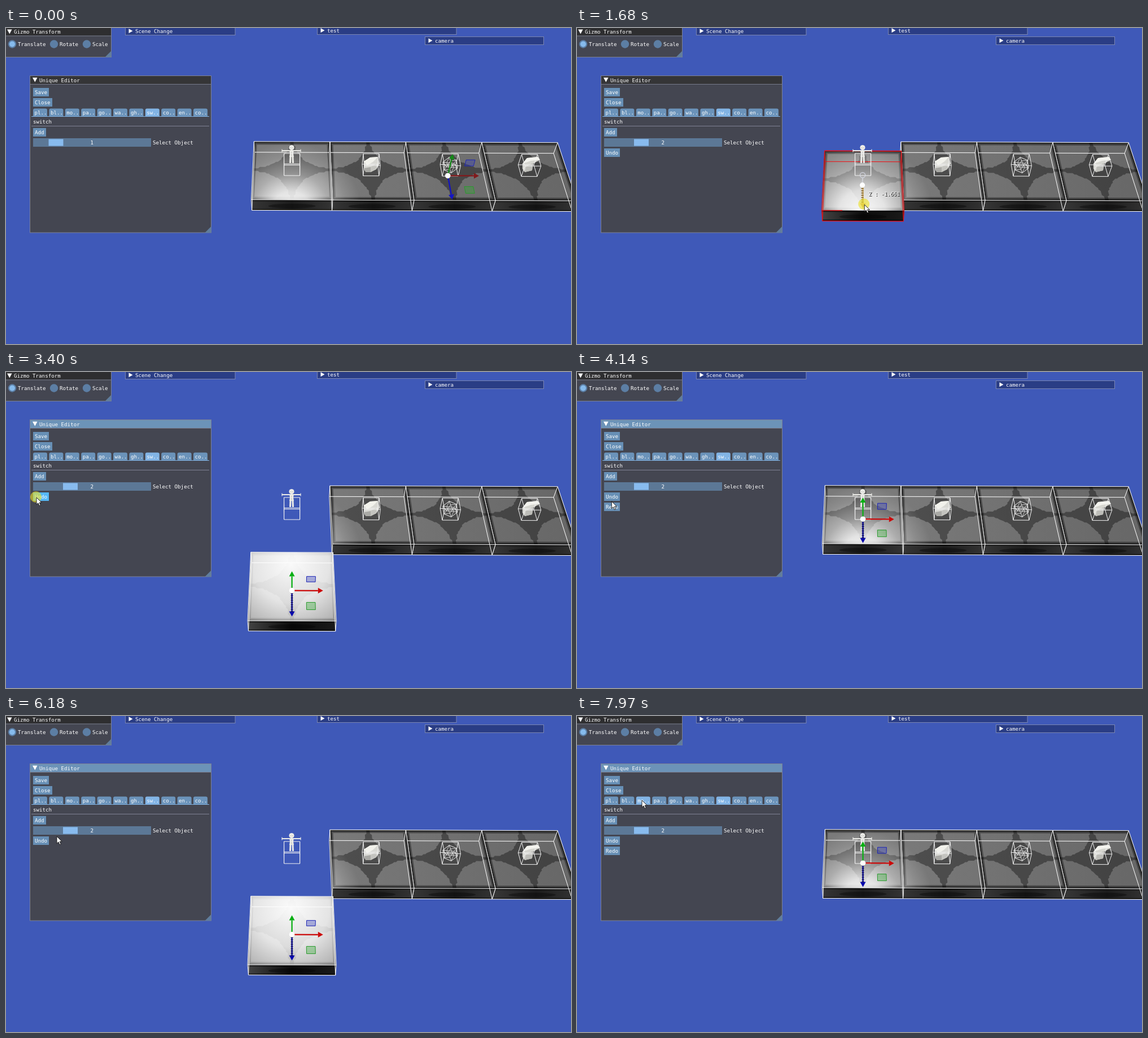
Write an HTML page with a canvas that moves like this. It is 1001x559 px and loops after 8000 ms.

```html
<!DOCTYPE html>
<html lang="en">
<head>
<meta charset="utf-8">
<title>Unique Editor</title>
<style>
  html, body { margin: 0; width: 100%; height: 100%; overflow: hidden; background: #3f59b8; }
  canvas { display: block; }
</style>
</head>
<body>
<canvas id="stage" width="1001" height="559"></canvas>
<script>
const g = document.getElementById('stage').getContext('2d');
const LOOP = 8000, MOVED = 1.1346, UNIT = 9.774;
const ORANGE = '#dca75f';

// time, x, y of the pointer tip
const pointer = [
  [190, 640, 575], [800, 506, 268], [930, 506, 267], [1000, 506, 267],
  [1210, 506, 290], [1540, 506, 290], [1610, 507, 300], [1960, 528, 417],
  [2250, 530, 424], [2390, 530, 424], [2780, 38, 226], [2920, 54, 222],
  [3860, 54, 222], [4480, 71, 238], [5480, 71, 238], [5800, 291, 317],
  [6180, 90, 213], [6310, 85, 214], [6470, 68, 222], [6740, 68, 222],
  [7080, 121, 126], [7150, 121, 124], [7350, 121, 124], [7640, 98, 146], [7970, 115, 149]
];
const drag = [[1540, 0], [1610, 0.06], [1960, 1.09], [2250, MOVED]];
const presses = [[840, 915], [1540, 2390], [3400, 3530], [4480, 4580], [6640, 6770]];

function track(keys, t) {
  if (t <= keys[0][0]) return keys[0].slice(1);
  for (let i = 1; i < keys.length; i++) {
    const a = keys[i - 1], b = keys[i];
    if (t <= b[0]) {
      let k = (t - a[0]) / (b[0] - a[0]);
      k = k * k * (3 - 2 * k);
      return a.slice(1).map((v, j) => v + (b[j + 1] - v) * k);
    }
  }
  return keys[keys.length - 1].slice(1);
}

function offsetAt(t) {
  if (t < 3530) return track(drag, t)[0];
  return t >= 4550 && t < 6740 ? MOVED : 0;
}

// X: across, u: toward the viewer, h: downward from the block tops
function project(X, u, h) {
  const d = 0.007435 + 0.000115 * h - 0.0005 * u;
  const x = 506.6 + X / d;
  return [x, (1.4944 + 0.1666 * h + 0.6138 * u) / d + (x - 506) * 0.0037];
}

function trace(pts, open) {
  g.beginPath();
  pts.forEach((p, i) => i ? g.lineTo(p[0], p[1]) : g.moveTo(p[0], p[1]));
  if (!open) g.closePath();
}
function fill(pts, color) { trace(pts); g.fillStyle = color; g.fill(); }
function line(a, b, color, width = 1) {
  trace([a, b], true);
  g.strokeStyle = color; g.lineWidth = width; g.stroke();
}
function disc(x, y, r, color) {
  g.beginPath(); g.arc(x, y, r, 0, 7); g.fillStyle = color; g.fill();
}
function ring(x, y, r, color) {
  g.beginPath(); g.arc(x, y, r, 0, 7); g.strokeStyle = color; g.lineWidth = 1.2; g.stroke();
}
function rect(x, y, w, h, color, r = 0) {
  g.beginPath(); g.roundRect(x, y, w, h, r); g.fillStyle = color; g.fill();
}
function frame(x, y, w, h, color) {
  g.strokeStyle = color; g.lineWidth = 1; g.strokeRect(x, y, w, h);
}
function label(s, x, y, color = '#fff') { g.fillStyle = color; g.fillText(s, x, y); }

function corners(X, u, half, depth, top, bottom) {
  const at = h => [[X - half, u], [X + half, u], [X + half, u + depth], [X - half, u + depth]]
    .map(p => project(p[0], p[1], h));
  return [at(top), at(bottom)];
}

function wire([top, bottom], color) {
  for (let i = 0; i < 4; i++) {
    const j = (i + 1) % 4;
    line(top[i], top[j], color);
    line(bottom[i], bottom[j], color);
    line(top[i], bottom[i], color);
  }
}

function hoverWire([top, bottom], moved) {
  const red = '#f40c10', mix = (a, b, k) => [a[0] + (b[0] - a[0]) * k, a[1] + (b[1] - a[1]) * k];
  line(top[0], moved ? top[1] : mix(top[0], top[1], 0.14), red, 1.3);
  line(moved ? bottom[0] : mix(bottom[0], bottom[1], 0.55), bottom[1], red);
  line(top[3], moved ? mix(top[3], top[2], 0.25) : top[2], red, 1.2);
  line(bottom[3], bottom[2], red, 1.3);
  for (const i of [0, 1, 2, 3]) line(top[i], bottom[i], red);
  for (const face of [top, bottom]) {
    line(face[0], face[3], red);
    line(face[1], face[2], red);
  }
}

// four-pointed star left between quarter circles at the corners
function star(X, u, h = 0) {
  const pts = [], snap = v => Math.round(v * 44) / 44;
  for (let q = 0; q < 4; q++) {
    const cx = q === 0 || q === 3 ? -0.5 : 0.5, cy = q < 2 ? 0 : 1;
    for (let i = 0; i <= 24; i++) {
      const a = Math.PI / 2 * (q + 1 - i / 24);
      pts.push(project(X + snap(cx + 0.472 * Math.cos(a)), u + snap(cy + 0.472 * Math.sin(a)), h));
    }
  }
  return pts;
}

function block(X, u, shift, hover) {
  const box = corners(X, u, 0.5, 1, 0, 1), [top, bottom] = box;
  const k = shift / MOVED;
  fill([top[0], top[3], bottom[3], bottom[0]], '#141414');

  const front = [top[3], top[2], bottom[2], bottom[3]];
  const dark = g.createLinearGradient(top[3][0], 0, top[2][0], 0);
  dark.addColorStop(0, k ? '#444' : '#363636');
  dark.addColorStop(0.5, k ? '#0a0a0a' : '#1c1c1c');
  dark.addColorStop(1, k ? '#1a1a1a' : '#343434');
  fill(front, dark);

  const base = g.createLinearGradient(570, 0, 1000, 0);
  base.addColorStop(0, '#7a7a7a');
  base.addColorStop(1, '#676767');
  fill(top, base);

  g.save();
  trace(top);
  g.clip();
  fill(star(X, u), 'rgba(0,0,0,.36)');
  for (const w of [11, 7, 4]) {
    trace(top);
    g.strokeStyle = 'rgba(0,0,0,.32)'; g.lineWidth = w; g.stroke();
  }
  const R = 125 * (1 + 0.8 * k), cy = 327 + 14 * k;
  const glow = g.createRadialGradient(505, cy, 0, 505, cy, R);
  [[0, 0.97], [0.3, 0.8], [0.56, 0.38], [0.8, 0.14], [1, 0]]
    .forEach(([p, a]) => glow.addColorStop(p, `rgba(255,255,255,${a})`));
  fill(top, glow);
  g.restore();

  g.save();
  trace(front);
  g.clip();
  line(top[3], top[2], 'rgba(0,0,0,.6)', 5);
  line(bottom[3], bottom[2], 'rgba(0,0,0,.55)', 5);
  g.beginPath();
  g.ellipse((bottom[3][0] + bottom[2][0]) / 2, bottom[2][1] - 8, 42, 4, 0, 0, 7);
  g.fillStyle = 'rgba(0,0,0,.35)'; g.fill();
  g.restore();

  if (hover) hoverWire(box, shift > 0);
  else wire(box, '#fff');
}

function cage(X) { wire(corners(X, 0.4, 0.1, 0.2, -0.95, 0), '#f4f4f4'); }

function player() {
  const c = '#ecece8', shade = '#b9b9b4';
  line([489, 217], [522, 217], c, 2);
  line([489, 214.5], [489, 219.5], c, 1.2);
  line([522, 214.5], [522, 219.5], c, 1.2);
  fill([[502, 216], [510, 216], [509, 222], [510, 228], [502, 228], [503, 222]], c);
  line([504, 227], [503.5, 239], c, 3);
  line([508, 227], [508.5, 239], c, 3);
  line([506, 219], [506, 227], shade, 1);
  disc(506, 211.5, 4.6, c);
  disc(504.5, 212, 0.8, shade);
  disc(507.5, 212, 0.8, shade);
  cage(0);
}

function rocks() {
  fill([[634, 236], [645, 229], [659, 228], [662, 240], [656, 250], [646, 255], [635, 252]], '#d9d9d4');
  fill([[634, 236], [645, 229], [659, 228], [650, 237], [640, 243]], '#f2f2ec');
  fill([[634, 248], [646, 246], [646, 255], [637, 255]], '#a9a9a5');
  fill([[646, 246], [656, 240], [656, 249], [646, 255]], '#c4c4bf');
  fill([[915, 240], [923, 230], [942, 228], [946, 233], [934, 240], [932, 252], [919, 255], [915, 249]], '#d6d6d0');
  fill([[915, 240], [923, 230], [942, 228], [946, 233], [930, 235]], '#f3f3ee');
  fill([[921, 246], [933, 239], [932, 252], [919, 255]], '#bdbdb8');
}

function polyhedron() {
  const at = (r, n, a) => [787 + r * Math.cos(a + n * Math.PI / 3), 242.5 + r * Math.sin(a + n * Math.PI / 3)];
  for (let i = 0; i < 6; i++) {
    const o = at(14, i, 0.4), m = at(7.5, i + 0.2, 0.4);
    line(o, at(14, i + 1, 0.4), '#f0f0f0');
    line(o, m, '#dcdcdc');
    line(m, at(14, i + 1, 0.4), '#e8e8e8', 0.8);
    line(m, at(7.5, i + 2.2, 0.4), '#f0f0f0', 0.8);
  }
}

function arrow(a, b, color) {
  const dx = b[0] - a[0], dy = b[1] - a[1], n = Math.hypot(dx, dy), x = dx / n, y = dy / n;
  const m = [b[0] - 9 * x, b[1] - 9 * y];
  line(a, m, color, 2.3);
  fill([b, [m[0] - 5 * y, m[1] + 5 * x], [m[0] + 5 * y, m[1] - 5 * x]], color);
}

function hatch(a, b, color) {
  g.save();
  g.setLineDash([2, 2]);
  line(a, [b[0], b[1] - 8], color, 4);
  g.restore();
}

function gizmo(X, v, faded, hot) {
  const u = 0.5 + v, L = 0.4 * (0.0072425 - 0.0005 * v) / 0.0072425;
  const at = (a, b, c) => project(X + a * L, u + c * L, 0.5 - b * L / 0.2035);
  const o = at(0, 0, 0), lo = 0.46, hi = 0.74;
  const quad = (f, color, tint) => {
    const pts = [f(lo, lo), f(hi, lo), f(hi, hi), f(lo, hi)];
    fill(pts, tint);
    trace(pts);
    g.strokeStyle = color; g.lineWidth = 1; g.stroke();
  };
  quad((a, b) => at(a, b, 0), '#1c24b4', 'rgba(50,60,190,.36)');
  quad((a, b) => at(a, 0, b), '#2a9a2e', 'rgba(50,170,50,.36)');
  const up = at(0, 1, 0), side = at(1, 0, 0), near = at(0, 0, 1);
  arrow(o, side, faded ? '#801a1c' : '#cb0a0a');
  arrow(o, up, faded ? '#138a18' : '#0aaf14');
  arrow(o, near, hot === 'z' ? ORANGE : faded ? '#1414c4' : '#0808ae');
  if (!faded) hatch(o, near, 'rgba(0,0,40,.6)');
  disc(o[0], o[1], 4.8, hot === 'c' ? ORANGE : '#fff');
}

function shadowText(s, x, y) {
  label(s, x + 1, y + 1, '#000');
  label(s, x, y);
}

function dragMarks(t, v) {
  const start = project(0, 0.5, 0.5), now = project(0, 0.5 + v, 0.5);
  if (t < 1000) {
    disc(start[0] - 0.5, start[1], 4.6, ORANGE);
    ring(start[0] - 0.5, start[1], 4.6, '#e6c48c');
    shadowText('X : 0.000 Y : 0.000 Z : 0.000', now[0] + 10, now[1] + 19);
    return;
  }
  const tip = project(0, 0.88 + v, 0.5);
  ring(start[0] - 0.5, start[1], 4.6, '#d5d8e4');
  if (v > 0.05) line([start[0] - 0.5, start[1] + 5], [now[0] - 1, now[1] - 4], '#cfd1d8', 1.8);
  arrow(now, tip, '#d8b56c');
  hatch([now[0] - 1, now[1] + 5], [tip[0] - 1, tip[1]], '#8e7340');
  disc(now[0] - 1, now[1], 4.6, '#fff');
  shadowText('Z : ' + (-v * UNIT).toFixed(3), now[0] + 10, now[1] + 19);
}

function collapsed(s, x, y, w, h) {
  rect(x, y, w, h, '#2a3d85');
  frame(x, y, w, h, '#7b86b2');
  const m = y + h - 7.2;
  fill([[x + 6, m - 4], [x + 13, m], [x + 6, m + 4]], '#fff');
  label(s, x + 17.5, m + 3.3);
}

function panel(s, x, y, w, h, bar, title) {
  rect(x, y, w, h, '#444651');
  rect(x, y, w, bar, title);
  line([x, y + bar + 0.5], [x + w, y + bar + 0.5], '#777a8a');
  frame(x, y, w, h, '#7d8194');
  fill([[x + w, y + h - 11], [x + w, y + h], [x + w - 11, y + h]], '#607d9c');
  const m = y + bar / 2;
  fill([[x + 4.5, m - 4], [x + 13, m - 4], [x + 8.8, m + 4]], '#fff');
  label(s, x + 16.5, m + 3.8);
}

function ui(t, p, down) {
  const over = (x, y, w, h) => !(t > 1540 && t < 2390) &&
    p[0] >= x && p[0] <= x + w && p[1] >= y && p[1] <= y + h;
  const button = (s, y, w) => {
    const hot = over(48, y, w, 15);
    rect(48, y, w, 15, hot ? (down ? '#55b8f6' : '#82b6e8') : '#678fb5');
    label(s, 51, y + 11);
  };

  collapsed('Scene Change', 211.5, -5.5, 194.5, 18);
  collapsed('test', 551.5, -5.5, 246.5, 17);
  collapsed('camera', 742.5, 15.5, 210, 14);

  panel('Gizmo Transform', -2.5, -0.5, 189, 52, 14, '#2e2e30');
  [['Translate', 11], ['Rotate', 85], ['Scale', 143]].forEach(([s, x], i) => {
    disc(x, 28.5, 7.2, '#5c7ea4');
    if (!i) disc(x, 28.5, 5, '#86bbec');
    label(s, x + 10, 32);
  });

  panel('Unique Editor', 42.5, 84.5, 321, 277.5, 14.5, t < 3400 ? '#353537' : '#6c93b8');
  button('Save', 106, 28);
  button('Close', 124, 34);
  ['pl', 'bl', 'mo', 'pa', 'go', 'wa', 'gh', 'sw', 'co', 'en', 'co'].forEach((s, i) => {
    const x = 48 + i * 28.4, hot = i === 7 || over(x, 142.5, 25, 14.5);
    rect(x, 142.5, 25, 14.5, hot ? '#82b4e5' : '#6b93ba', [3, 3, 0, 0]);
    label(s + '..', x + 2.5, 153);
  });
  line([45, 156.5], [360, 156.5], '#82b4e5');
  label('switch', 48, 169);
  line([45, 173.5], [360, 173.5], '#7f8294');
  button('Add', 177, 23);

  const second = t >= 860;
  rect(48, 195, 209, 15, '#5c7896');
  rect(second ? 101 : 75.5, 196.5, 26, 12, '#88bbee');
  label(second ? '2' : '1', 149.5, 206);
  label('Select Object', 260, 206);
  if (t >= 1000) button('Undo', 213, 28);
  if ((t >= 3530 && t < 4550) || t >= 6740) button('Redo', 231, 28);
}

function cursor(x, y) {
  trace([[0, 0], [0, 12.5], [3, 9.8], [5, 14.6], [7.2, 13.7], [5.2, 9], [9.2, 9]]
    .map(q => [x + q[0], y + q[1]]));
  g.fillStyle = '#fff'; g.fill();
  g.strokeStyle = '#111'; g.lineWidth = 0.9; g.stroke();
}

function draw(t) {
  const p = track(pointer, t), v = offsetAt(t);
  const down = presses.some(([a, b]) => t >= a && t < b);
  const using = (t >= 860 && t < 1000) || (t >= 1540 && t < 2390);
  const back = project(0, v, 0)[1], low = project(0, 1 + v, 1)[1];
  const hover = p[0] > 430 && p[0] < 582 && p[1] > back && p[1] < low;

  g.font = '9.17px "DejaVu Sans Mono", monospace';
  g.fillStyle = '#3f59b8';
  g.fillRect(0, 0, 1001, 559);

  for (const X of [3, 2, 1]) block(X, 0, 0, false);
  block(0, v, v, hover);
  rocks();
  polyhedron();
  for (const X of [1, 2, 3]) cage(X);
  player();

  if (using) dragMarks(t, v);
  else if (t < 860) gizmo(2, 0, true);
  else gizmo(0, v, false, t >= 1540 ? '' : t < 1080 ? 'c' : 'z');

  ui(t, p, down);
  if (down) disc(p[0] - 1, p[1] - 1, 10, 'rgba(235,225,40,.62)');
  if (t >= 190) cursor(p[0], p[1]);
}

const began = performance.now();
function tick() {
  draw((performance.now() - began) % LOOP);
  requestAnimationFrame(tick);
}
tick();
</script>
</body>
</html>
```
